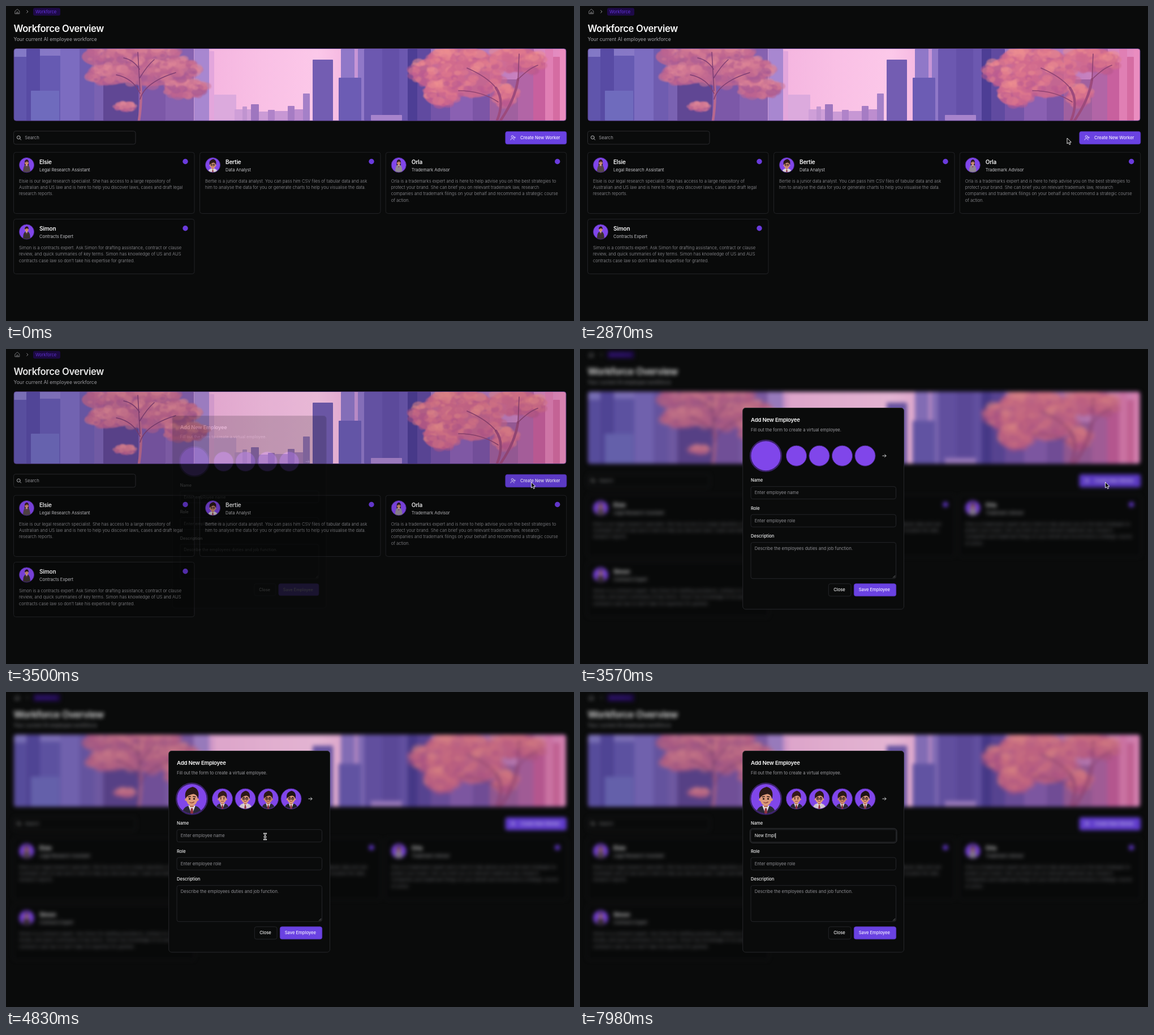
An HTML page for the animation above (8000 ms loop, 1004x558 px).

```html
<!DOCTYPE html>
<html lang="en">
<head>
<meta charset="utf-8">
<title>Workforce Overview</title>
<style>
html, body { margin: 0; width: 100%; height: 100%; overflow: hidden; background: #0a0b0b; }
svg { display: block; width: 100vw; height: 100vh; }
text { font-family: Inter, Roboto, sans-serif; }
.icon { fill: none; stroke-linecap: round; stroke-linejoin: round; }
.soft { filter: blur(1px); }
</style>
</head>
<body>
<svg id="stage" viewBox="0 0 1004 558"></svg>
<script>
const LOOP = 8000, STEP = 70, PURPLE = '#8046ea', LINE = '#222326';

const rect = (x, y, w, h, r, fill, stroke = 'none', more = '') =>
  `<rect x="${x}" y="${y}" width="${w}" height="${h}" rx="${r}" fill="${fill}" stroke="${stroke}" ${more}/>`;
const text = (x, y, s, fill, size = 7.6, weight = 400, more = '') =>
  `<text x="${x}" y="${y}" fill="${fill}" font-size="${size}" font-weight="${weight}" ${more}>${s}</text>`;
const disc = (x, y, r, fill, more = '') => `<circle cx="${x}" cy="${y}" r="${r}" fill="${fill}" ${more}/>`;
const oval = (x, y, rx, ry, fill, opacity) =>
  `<ellipse cx="${x.toFixed(1)}" cy="${y.toFixed(1)}" rx="${rx.toFixed(1)}" ry="${ry.toFixed(1)}" fill="${fill}" opacity="${opacity}"/>`;
const icon = (d, color = '#d8d8da', width = 0.9) =>
  `<path class="icon" d="${d}" stroke="${color}" stroke-width="${width}"/>`;

let seed = 7;
const rnd = () => (seed = seed * 16807 % 2147483647) / 2147483647;

// Banner
const buildings = [
  [14, 90, 36, '#6055ac'], [36, 76, 24, '#584ba4'], [60, 88, 36, '#665ab2'], [96, 76, 36, '#7c6cc0'],
  [130, 76, 26, '#6f5cb0'], [156, 110, 30, '#7a62b2'], [172, 80, 62, '#604794'], [234, 76, 48, '#7c58a8'],
  [282, 76, 50, '#8662b0'], [333, 76, 26, '#a887d0'], [359, 80, 9, '#e3a6dc'], [44, 150, 50, '#6f6bbd'],
  [368, 157, 39, '#dcaadd'], [404, 183, 30, '#cf9fd8'], [418, 178, 8, '#c094d0'], [433, 174, 14, '#9e76bf'],
  [447, 187, 18, '#cb9bd6'], [463, 184, 12, '#b083c9'], [475, 186, 24, '#c797d4'], [498, 177, 12, '#a67cc4'],
  [510, 183, 16, '#bd8dcf'], [525, 155, 12, '#a480c8'], [542, 95, 36, '#735db2'], [592, 76, 24, '#9078c8'],
  [616, 76, 6, '#c796d6'], [622, 76, 11, '#9078c8'], [588, 127, 40, '#6c5cb4'], [633, 76, 78, '#6c58b0'],
  [665, 76, 30, '#6450a8'], [645, 193, 55, '#a784cc'], [710, 76, 18, '#4d3e95'], [727, 76, 24, '#604aa0'],
  [751, 120, 34, '#7454a8'], [785, 110, 40, '#8a60b2'], [825, 90, 30, '#7c55a6'], [855, 130, 50, '#a0609f'],
  [905, 76, 28, '#b265a6'], [932, 100, 22, '#c8609e'], [953, 76, 14, '#e07fb4'], [967, 90, 12, '#d56ca2'],
  [979, 76, 11, '#ea8dc0']];
const leftLeaves = [[190, 90, 56, 20], [250, 86, 58, 16], [182, 122, 36, 18], [255, 118, 56, 24],
  [318, 146, 38, 17], [300, 112, 40, 20], [211, 178, 18, 7]];
const rightLeaves = [[800, 90, 54, 18], [762, 118, 44, 28], [768, 155, 30, 22], [826, 128, 50, 34],
  [900, 95, 46, 22], [882, 158, 20, 17], [930, 100, 20, 16]];

function leaves([x, y, rx, ry], colors) {
  let out = oval(x, y, rx, ry, colors[1], 0.85);
  for (let i = 0; i < 60; i++) {
    const a = rnd() * 6.283, d = Math.sqrt(rnd()), up = Math.sin(a) * d;
    const r = Math.min(2 + rnd() * 6, ry / 2);
    const tone = Math.min(0.99, Math.max(0, rnd() * 0.7 + 0.15 - up * 0.3));
    out += oval(x + Math.cos(a) * d * rx, y + up * ry, r * 1.5, r, colors[Math.floor(tone * colors.length)], 0.55);
  }
  return out;
}

const sky = ['#8279c6', '#8b78c6', '#a684cc', '#f5b6e0', '#f9c0e5', '#fcc8e9', '#f5b8e1', '#9b80c8', '#a074be', '#ea8dc0'];
const skyAt = [0, 12, 30, 36, 45, 55, 60, 65, 80, 100];

const banner = `<g clip-path="url(#bannerClip)">
  ${rect(14, 76, 976, 127, 0, 'url(#sky)')}
  ${buildings.map(([x, y, w, c]) => rect(x, y, w, 203 - y, 1, c)).join('')}
  <g class="soft">
  ${leftLeaves.map(b => leaves(b, ['#a65a93', '#bd6590', '#d07692', '#df8797'])).join('')}
  ${rightLeaves.map(b => leaves(b, ['#b95a90', '#d06a8e', '#e27b8d', '#ec8e90'])).join('')}
  </g>
  ${icon('M235 203Q241 165 237 130', '#b8688e', 4.5)}
  ${icon('M237 150L233 82M237 165Q245 135 300 118M237 155Q225 128 195 122M236 128Q250 105 262 95M236 112Q225 95 208 92', '#7f3f74', 1.5)}
  ${icon('M868 203Q882 168 866 145M874 203Q900 165 905 130', '#9c4a7c', 4.5)}
  ${icon('M866 145Q850 125 815 110M905 132L907 85M870 170Q840 150 800 150M905 130Q925 110 940 105', '#8f4473', 1.7)}
  </g>${rect(14, 75.5, 976, 127.8, 4, 'none', '#54397f', 'stroke-width=".9"')}`;

// Cartoon portrait in a unit circle; `far` shows head and torso
function portrait(x, y, r, o) {
  const { hair = '#2b1816', skin = '#dc9a7a', suit = '#2a2838', tie = '#8c2f3c', long, glasses, far } = o;
  const part = (d, fill) => `<path d="${d}" fill="${fill}"/>`;
  return `<g transform="translate(${x} ${y}) scale(${r})" clip-path="url(#round)">${disc(0, 0, 1, PURPLE)}
    <g transform="${far ? 'translate(0 -.3) scale(.62)' : 'scale(1.1)'}">
    ${long ? part('M-.46.6Q-.55-.68 0-.7T.46.6Z', hair) : ''}
    ${part('M-.8 2.2Q-.8.58-.25.45H.25Q.8.58.8 2.2Z', suit)}
    ${part('M-.22.42L0 1 .22.42Z', '#e6dfe4')}${part('M-.06.58H.06L.1 1H-.1Z', tie)}
    ${rect(-0.12, 0.2, 0.24, 0.32, 0.05, '#b97558')}
    ${disc(-0.35, 0.05, 0.08, skin)}${disc(0.35, 0.05, 0.08, skin)}
    <ellipse rx=".35" ry=".43" fill="${skin}"/>
    ${part('M-.39-.02Q-.52-.6 .05-.74Q.52-.62.39 0Q.32-.26.1-.3Q-.26-.24-.39-.02Z', hair)}
    ${disc(-0.14, 0, 0.055, '#241312')}${disc(0.14, 0, 0.055, '#241312')}
    ${icon('M-.22-.12L-.08-.14M.08-.14L.22-.12', hair, 0.05)}
    ${icon('M-.12.22Q0 .3.13.2', '#8b3f37', 0.05)}
    ${glasses ? icon('M-.25 0a.11.11 0 1 0 .22 0a.11.11 0 1 0-.22 0M.03 0a.11.11 0 1 0 .22 0a.11.11 0 1 0-.22 0', '#1b1417', 0.04) : ''}
    </g></g>`;
}

// Page
function card(x, y, h, name, role, lines, look) {
  return rect(x + 0.5, y, 319.5, h, 4, '#090a0a', LINE)
    + portrait(x + 23.5, y + 22.5, 13, look)
    + disc(x + 23.5, y + 22.5, 13.2, 'none', 'stroke="#4a2a8c" stroke-width=".9"')
    + text(x + 46, y + 20.5, name, '#f5f5f6', 10, 600, 'letter-spacing="-.2"')
    + text(x + 46, y + 33.4, role, '#c3c3c7', 7.55)
    + disc(x + 304, y + 16.3, 4.7, '#6a3bdc')
    + lines.map((l, i) => text(x + 10, y + 53.7 + i * 11.25, l, '#97979c', 7.65, 300)).join('');
}

const button = (x, y, w, h, id) =>
  rect(x, y, w, h, 3.5, '#6a42e2', '#5733bf', `stroke-width=".8" id="${id}"`);

const page = rect(48, 3.5, 48, 13.5, 3, '#1e0a48')
  + text(52, 12.7, 'Workforce', '#6434dc', 7.55)
  + icon('M16.2 8.8L20 5.6 23.8 8.8V13.7H16.2ZM18.8 13.6V10.8H21.2V13.6', '#9a9a9e', 0.8)
  + icon('M36.7 7.8L38.9 10 36.7 12.2', '#a5a5a9')
  + text(13.5, 46, 'Workforce Overview', '#fafafa', 16.7, 600, 'letter-spacing="-.36"')
  + text(13.5, 62.2, 'Your current AI employee workforce', '#a6a6ab', 8.65)
  + banner
  + rect(13.5, 221.7, 215.5, 23.2, 3.5, '#0a0b0b', '#2a2b2e')
  + icon('M25.2 232.8a2.9 2.9 0 1 1-5.8 0a2.9 2.9 0 1 1 5.8 0M24.5 235L26.6 237', '#d0d0d3')
  + text(33.3, 236.2, 'Search', '#9b9ba0', 7.7)
  + button(882.8, 222.3, 108, 22.4, 'create')
  + icon('M897 231.3a1.9 1.9 0 1 1-3.8 0a1.9 1.9 0 1 1 3.8 0M891.8 237.3Q892 234.6 895 234.6T898.2 237.3M899 231.5V234.5M897.5 233H900.5', '#efe9ff', 0.8)
  + text(909, 236.2, 'Create New Worker', '#f3efff', 7.55, 500)
  + card(13, 259.2, 108.3, 'Elsie', 'Legal Research Assistant', [
    'Elsie is our legal research specialist. She has access to a large repository of',
    'Australian and US law and is here to help you discover laws, cases and draft legal',
    'research reports.'], { far: 1, long: 1, hair: '#3a2020', suit: '#54464a' })
  + card(342, 259.2, 108.3, 'Bertie', 'Data Analyst', [
    'Bertie is a junior data analyst. You can pass him CSV files of tabular data and ask',
    'him to analyse the data for you or generate charts to help you visualise the data.'],
    { glasses: 1, suit: '#d8cfd4' })
  + card(670.7, 259.2, 108.3, 'Orla', 'Trademark Advisor', [
    'Orla is a trademarks expert and is here to help advise you on the best strategies to',
    'protect your brand. She can brief you on relevant trademark law, research',
    'companies and trademark filings on your behalf and recommend a strategic course',
    'of action.'], { far: 1, long: 1, hair: '#2c1b22', suit: '#8f8794' })
  + card(13, 377.5, 97, 'Simon', 'Contracts Expert', [
    'Simon is a contracts expert. Ask Simon for drafting assistance, contract or clause',
    'review, and quick summaries of key terms. Simon has knowledge of US and AUS',
    'contracts case law so don’t take his expertise for granted.'], { far: 1, suit: '#39302e' });

// Dialog
const circles = [[328.5, 26], [382.5, 17.5], [423, 17.5], [463.5, 17.5], [504, 17.5]];
const looks = [{}, { hair: '#34191a' }, { glasses: 1, suit: '#cfc6cc' }, { glasses: 1, skin: '#c98667' },
  { glasses: 1, suit: '#1f2029', hair: '#1d1314' }];
const field = (y, h) => rect(302, y, 256.5, h, 3.5, '#0a0b0b', '#242529');

const dialog = rect(287.7, 104.5, 284.8, 356.5, 5, '#0a0b0b', '#26272a')
  + text(302, 129.4, 'Add New Employee', '#fafafa', 9.6, 600, 'letter-spacing="-.2"')
  + text(302, 145.9, 'Fill out the form to create a virtual employee.', '#9a9a9f')
  + circles.map(([x, r], i) => disc(x, 189.2, r + (i ? 0.6 : 1.3), PURPLE,
      `stroke="#3a2169" stroke-width="${i ? 1 : 2.6}"`)).join('')
  + `<g id="faces">${circles.map(([x, r], i) => portrait(x, 189.2, r, looks[i])).join('')}</g>`
  + icon('M534.8 189.2H541M538.6 186.8L541 189.2 538.6 191.6', '#e4e4e6')
  + text(302, 235.4, 'Name', '#f0f0f1', 7.55, 500) + field(243.7, 22)
  + rect(300.5, 241.8, 259.5, 25.6, 5, 'none', '#3c3d41', 'id="ring" stroke-width=".9"')
  + text(308.8, 257.4, '', '#8f8f94', 7.6, 400, 'id="name"')
  + rect(0, 250, 0.9, 9, 0, '#f2f2f2', 'none', 'id="caret"')
  + text(302, 284.8, 'Role', '#f0f0f1', 7.55, 500) + field(293.2, 22)
  + text(308.8, 307, 'Enter employee role', '#8f8f94')
  + text(302, 334.2, 'Description', '#f0f0f1', 7.55, 500) + field(342.7, 64)
  + text(308.8, 355.7, 'Describe the employees duties and job function.', '#8f8f94')
  + icon('M553.3 405L557 401.3M555.5 405L557 403.5', '#a0a0a4', 0.6)
  + rect(439.3, 415.8, 39.7, 22, 3.5, '#0a0b0b', '#242529')
  + text(448.2, 429.4, 'Close', '#f0f0f1', 7.6, 500)
  + button(484.3, 415.8, 74.4, 22, 'save')
  + text(492.7, 429.4, 'Save Employee', '#f3efff', 7.6, 500);

const beam = 'M-2-5.2Q0-5.2 0-4V4Q0 5.2-2 5.2M2-5.2Q0-5.2 0-4M0 4Q0 5.2 2 5.2M-1.3.8H1.3';

stage.innerHTML = `<defs>
  <linearGradient id="sky">${sky.map((c, i) => `<stop offset="${skyAt[i]}%" stop-color="${c}"/>`).join('')}</linearGradient>
  <clipPath id="bannerClip">${rect(14, 75.5, 976, 127.8, 4, '#000')}</clipPath>
  <clipPath id="round">${disc(0, 0, 1, '#000')}</clipPath></defs>
  <g id="page">${page}</g><g id="dialog">${dialog}</g>
  <g id="pointer"><path id="arrow" d="M0 0V10L2.4 7.9 4.1 11.6 5.9 10.8 4.2 7.2H7.3Z" fill="#000" stroke="#fff" stroke-width=".9"/>
  <g id="beam">${icon(beam, '#fff', 2.4)}${icon(beam, '#111', 0.8)}</g></g>`;

// Motion
const moves = [[70, 640, 550], [420, 509, 340], [980, 509, 340], [1260, 759, 240], [1400, 759, 240],
  [1680, 844, 238], [1820, 825, 222], [1890, 825, 222], [1960, 841, 238], [2800, 841, 238], [2870, 861, 234],
  [3150, 905, 228], [3360, 928.5, 236], [4060, 928.5, 236], [4830, 458, 256]];
const typing = [[0, ''], [5390, 'N'], [5530, 'Ne'], [5600, 'New'], [7560, 'New E'], [7700, 'New Em'],
  [7840, 'New Emp'], [7980, 'New Empl']];
const caretOff = [[0, 4900], [6020, 6370], [6580, 7070], [7350, 7560]];

function pointerAt(t) {
  const i = moves.findIndex(m => m[0] > t);
  if (i < 0) return moves[moves.length - 1].slice(1);
  if (i === 0) return moves[0].slice(1);
  const [t0, x0, y0] = moves[i - 1], [t1, x1, y1] = moves[i];
  const u = (t - t0) / (t1 - t0), k = u * u * (3 - 2 * u);
  return [x0 + (x1 - x0) * k, y0 + (y1 - y0) * k];
}

const el = id => document.getElementById(id);
const show = (id, on) => { el(id).style.display = on ? '' : 'none'; };

function draw(t) {
  const opening = t >= 3500 && t < 3570, open = t >= 3570;
  el('page').style.filter = open ? 'blur(3.8px) brightness(.9)' : opening ? 'brightness(.92)' : 'none';
  show('dialog', open || opening);
  el('dialog').setAttribute('opacity', opening ? 0.17 : 1);
  el('dialog').setAttribute('transform', opening ? 'translate(430 288.5) scale(.955) translate(-430 -282.5)' : '');
  show('faces', t >= 4130);
  show('ring', t >= 4900);

  const typed = typing.filter(k => k[0] <= t).pop()[1], name = el('name');
  name.textContent = typed || 'Enter employee name';
  name.setAttribute('fill', typed ? '#f2f2f2' : '#8f8f94');
  el('caret').setAttribute('x', 308.8 + (typed && open ? name.getComputedTextLength() + 0.4 : -0.4));
  show('caret', !caretOff.some(([a, b]) => t >= a && t < b));

  const [x, y] = pointerAt(t), overField = open && x < 559;
  show('pointer', t >= 70 && t < 5390);
  el('pointer').setAttribute('transform', `translate(${x} ${y})`);
  show('arrow', !overField);
  show('beam', overField);
  el('create').setAttribute('fill', t >= 2940 && x > 882 ? '#643fd6' : '#6a42e2');
}

let last = -1;
function tick() {
  const t = Math.floor(performance.now() % LOOP / STEP) * STEP;
  if (t !== last) draw(last = t);
  requestAnimationFrame(tick);
}
tick();
</script>
</body>
</html>
```
